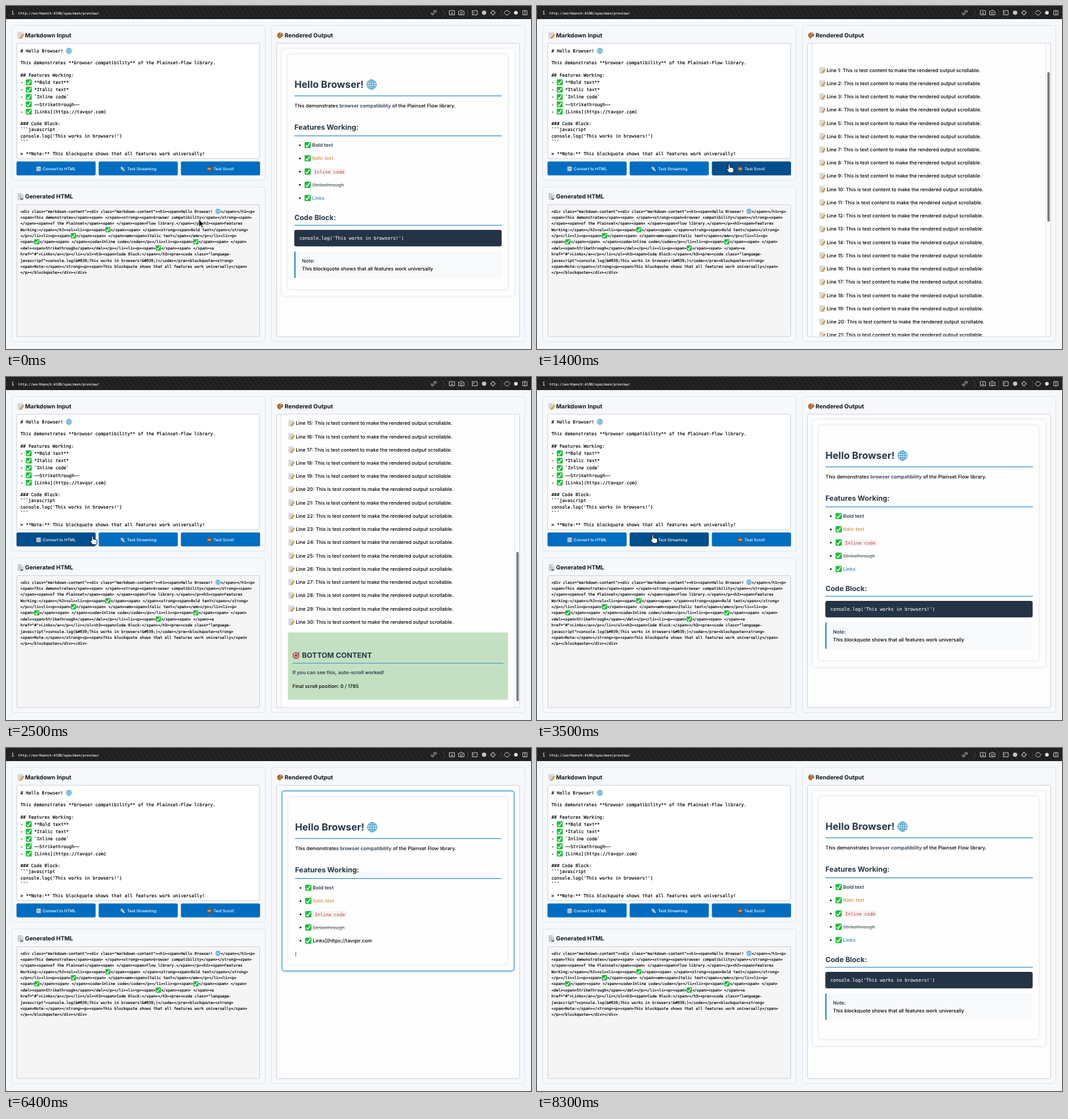
These frames come from a looping animation (800 px wide and 524 px high, 8.4 s). An HTML page:

```html
<!DOCTYPE html>
<html lang="en">
<head>
<meta charset="utf-8">
<title>Text renderer demo</title>
<style>
  html, body { margin: 0; width: 100%; height: 100%; overflow: hidden; background: #f5f8fb; }
  svg.stage { display: block; width: 100vw; height: 100vh; }
  text { font-family: Inter, "Open Sans", sans-serif; font-weight: 450; white-space: pre; text-rendering: geometricPrecision; fill: #000; }
  .mono { font-family: "DejaVu Sans Mono", monospace; font-weight: 400; stroke: #000; stroke-width: .16; }
  .head { font-weight: 680; fill: #263747; }
  .title { font-weight: 650; fill: #14171a; }
  .label { font-weight: 550; fill: #fff; }
  .light { fill: #f0f0f0; stroke: #f0f0f0; stroke-width: .1; }
  .b { font-weight: 640; fill: #2c3e50; }
  .i { font-style: italic; fill: #d07a1c; }
  .s { text-decoration: line-through; fill: #74807f; }
  .a { fill: #2b83cc; }
  .c { font-family: "DejaVu Sans Mono", monospace; font-weight: 400; font-size: 6.97px; fill: #d63a2e; }
  .panel { fill: #f6f8fb; stroke: #dbe1e9; stroke-width: .8; }
  .field { fill: #fff; stroke: #c5cad0; stroke-width: .8; }
  .button { fill: #006dc0; }
  .button.hover { fill: #004e8c; }
  .card { fill: #fefefe; stroke: #e7eaee; stroke-width: .6; filter: drop-shadow(0 .8px 2px rgba(0,0,0,.09)); }
  .card.live { stroke: #3f97d5; stroke-width: 1.15; filter: drop-shadow(0 0 2px rgba(52,152,219,.4)); }
</style>
</head>
<body>
<svg class="stage" viewBox="0 0 800 524" preserveAspectRatio="none">
  <defs>
    <pattern id="stripes" width="6" height="6" patternUnits="userSpaceOnUse" patternTransform="rotate(-35)">
      <rect width="6" height="6" fill="#1e1e1e"/><rect width="3" height="6" fill="#252525"/>
    </pattern>
    <clipPath id="view"><rect x="412.5" y="57.5" width="370" height="447"/></clipPath>
    <symbol id="check" viewBox="0 0 20 20">
      <rect x=".5" y=".5" width="19" height="19" rx="3.5" fill="#1fbd3a"/>
      <path d="M4 11l4 4.5L16 4" fill="none" stroke="#fff" stroke-width="2.8"/>
    </symbol>
    <symbol id="globe" viewBox="0 0 20 20">
      <circle cx="10" cy="10" r="9" fill="#d4eefa"/>
      <g fill="none" stroke="#2f90bf" stroke-width="1.15">
        <circle cx="10" cy="10" r="9"/><ellipse cx="10" cy="10" rx="4.3" ry="9"/>
        <path d="M10 1v18M1 10h18M2.5 5.5h15M2.5 14.5h15"/>
      </g>
    </symbol>
    <symbol id="memo" viewBox="0 0 20 20">
      <path d="M2 1h14v18H2z" fill="#eceeed" stroke="#a9adb0"/>
      <path d="M4 5h9M4 8h9M4 11h6M4 14h5" stroke="#9aa0a5"/>
      <path d="M9 16l8-10 3 2.5L12 18l-4 1z" fill="#eda52a" stroke="#7d5220" stroke-width=".8"/>
    </symbol>
    <symbol id="page" viewBox="0 0 20 20">
      <path d="M3 1h9l5 5v13H3z" fill="#e9ebec" stroke="#85898d"/>
      <path d="M5 5h5M5 8h9M5 11h9M5 14h6" stroke="#777"/><path d="M10 14l8 1-3 5-6-1z" fill="#6f7479"/>
    </symbol>
    <symbol id="palette" viewBox="0 0 20 20">
      <path d="M10 2c6 0 10 4 9 9-1 4-5 2-6 4s0 4-4 4C4 19 1 14 1 10s4-8 9-8z" fill="#b5733c"/>
      <circle cx="6" cy="7" r="2" fill="#e23e35"/><circle cx="12" cy="5.5" r="2" fill="#f3c72e"/>
      <circle cx="5" cy="12" r="2" fill="#3aa64f"/><circle cx="15.5" cy="9" r="2" fill="#3b7bd6"/>
    </symbol>
    <symbol id="cycle" viewBox="0 0 20 20">
      <rect x="1" y="1" width="18" height="18" rx="3" fill="#8fa9bb"/>
      <path d="M5 9a5 5 0 0 1 9-2V4M15 11a5 5 0 0 1-9 2v3" fill="none" stroke="#fff" stroke-width="2"/>
    </symbol>
    <symbol id="feed" viewBox="0 0 20 20">
      <path d="M3 2l5 1 9 11-2 4-5-3L3 6z" fill="#c9d3da"/><path d="M2 9l5 5M11 3l5 5" stroke="#78909c" stroke-width="2.4"/>
      <circle cx="16" cy="17" r="2" fill="#e2a13a"/>
    </symbol>
    <symbol id="scroll" viewBox="0 0 20 20">
      <path d="M3 2h14v16H3z" fill="#b97c43"/><path d="M2 2h16v4H2zM2 14h16v4H2z" fill="#76451f"/><path d="M6 8.5h8M6 11.5h8" stroke="#f0d2a0"/>
    </symbol>
    <symbol id="target" viewBox="0 0 20 20">
      <circle cx="9" cy="11" r="8.5" fill="#b83a36"/><circle cx="9" cy="11" r="5.8" fill="#e9dcd8"/><circle cx="9" cy="11" r="3.8" fill="#b83a36"/>
      <path d="M9 11l8-8" stroke="#39566b" stroke-width="1.6"/><path d="M14 5l2-4 1 2 2 1-3 2z" fill="#4a9ac4"/>
    </symbol>
  </defs>
  <g id="page-frame"></g>
  <g id="buttons"></g>
  <g id="output" clip-path="url(#view)"></g>
  <g id="pointer" stroke-linejoin="round">
    <path id="arrow" d="M0 0V11.2L2.7 8.7L4.6 12.8L6.4 12L4.6 8H8Z" fill="#000" stroke="#fff" stroke-width=".8"/>
    <path id="hand" d="M-1.2 .8Q0-.8 1.2 .8V5Q4.8 4.4 7 6.6V10L6 13H0L-3 8.8Q-4 6.4-2.5 6.4L-1.2 7.6Z" fill="#fff" stroke="#000" stroke-width=".9"/>
  </g>
</svg>
<script>
const LOOP = 8400;
const MONO = 0.602;   // advance of the monospaced face, in em
const BODY = 7.47;
const $ = id => document.getElementById(id);

const esc = s => s.replace(/&/g, '&amp;').replace(/</g, '&lt;').replace(/>/g, '&gt;');
const rect = (x, y, w, h, rx, attrs) => `<rect x="${x}" y="${y}" width="${w}" height="${h}" rx="${rx}" ${attrs}/>`;
const icon = (name, x, cy, size) => `<use href="#${name}" x="${x}" y="${cy - size / 2}" width="${size}" height="${size}"/>`;
// Text is placed by the middle of its capital letters.
const markup = (x, cy, size, cls, html) => `<text x="${x}" y="${cy + size * .364}" font-size="${size}" class="${cls}">${html}</text>`;
const text = (x, cy, size, cls, s) => markup(x, cy, size, cls, esc(s));
const rule = (x, y, w, color = '#3d93cf') => rect(x, y - .6, w, 1.2, 0, `fill="${color}"`);

const EMOJI = { '✅': 'check', '🌐': 'globe' };
function monoLine(x, cy, size, s, gap, art) {
  return s.split(/(✅|🌐)/u).map(part => {
    const name = EMOJI[part];
    const out = name ? icon(name, x - .2, cy, art) : text(x, cy, size, 'mono', part);
    x += name ? gap : part.length * size * MONO;
    return out;
  }).join('');
}

const input = `# Hello Browser! 🌐

This demonstrates **browser compatibility** of the Plainset-Flow library.

## Features Working:
- ✅ **Bold text**
- ✅ *Italic text*
- ✅ \`Inline code\`
- ✅ ~~Strikethrough~~
- ✅ [Links](https://tavqor.com)

### Code Block:
\`\`\`javascript
console.log('This works in browsers!')
\`\`\`

> **Note:** This blockquote shows that all features work universally!`.split('\n');

const generated = `<div class="markdown-content"><div class="markdown-content"><h1><span>Hello Browser! 🌐</span></h1><p>
<span>This demonstrates</span><span> </span><strong><span>browser compatibility</span></strong><span>
</span><span>of the Plainset</span><span> </span><span>Flow library.</span></p><h2><span>Features
Working:</span></h2><ul><li><p><span>✅</span><span> </span><strong><span>Bold text</span></strong>
</p></li><li><p><span>✅</span><span> </span><em><span>Italic text</span></em></p></li><li><p>
<span>✅</span><span> </span><code>Inline code</code></p></li><li><p><span>✅</span><span> </span>
<del><span>Strikethrough</span></del></p></li><li><p><span>✅</span><span> </span><a
href="#">Links</a></p></li></ul><h3><span>Code Block:</span></h3><pre><code class="language-
javascript">console.log(&#039;This works in browsers!&#039;)</code></pre><blockquote><strong>
<span>Note:</span></strong><p><span>This blockquote shows that all features work universally</span>
</p></blockquote></div></div>`.split('\n');

function toolbar() {
  const shapes = [
    'M649.5 12l5-4M651 8.5l2-1.6q2-1 2.7.6t-.8 2.6M653 11.5l-2 1.6q-2 1-2.7-.6t.8-2.6',
    'M675.5 7h8v6.5h-8zM677.5 11.5h4M679.5 8.5v2',
    'M689.5 8h2l1-1.5h2.5l1 1.5h2v5.5h-8.5zM693.7 9.2a1.6 1.6 0 1 0 .1 0',
    'M710.5 7h7.5v6.5h-7.5zM712 9l1.5 1.2-1.5 1.2',
    'M742 7.3a3 3 0 1 0 .1 0M742 6v2.5M742 12v2.5M738 10.3h2.5M743.7 10.3h2.5',
    'M762 7l-3 3.3 3 3.3M765 7l3 3.3-3 3.3M762 7h3M762 13.6h3',
    'M787.5 7h6.5v6.5h-6.5zM790.8 7v6.5'
  ];
  return rect(0, 0, 800, 20, 0, 'fill="url(#stripes)"')
    + text(8, 10.4, 8, 'mono light', 'i')
    + text(19, 10.6, 5.24, 'mono light', 'http://workbench:4100/specimen/preview/')
    + `<path d="${shapes.join('')}" fill="none" stroke="#cfcfcf" stroke-width=".9"/>`
    + '<path d="M667 5v11M703.5 5v11M755 5v11" stroke="#484848" stroke-width=".7"/>'
    + '<circle cx="728.5" cy="10.3" r="3.3" fill="#c4c4c4"/><circle cx="777" cy="10.3" r="2.8" fill="#e2e2e2"/>';
}

function pageFrame() {
  const panel = (x, y, h, name, title) => rect(x, y, 386, h, 4, 'class="panel"')
    + icon(name, x + 8, y + 15, 10.5) + text(x + 20, y + 14.8, 8.9, 'title', title);
  let out = toolbar()
    + panel(9, 29.7, 236.3, 'memo', 'Markdown Input')
    + panel(9, 276.2, 236.6, 'page', 'Generated HTML')
    + panel(404.5, 29.7, 483, 'palette', 'Rendered Output')
    + rect(16.5, 57, 370, 176, 1.5, 'class="field"')
    + rect(16.5, 303.5, 370, 201.5, 1.5, 'class="field" style="fill:#f5f5f5"')
    + rect(412.3, 57, 370.4, 448, 1.5, 'class="field" style="fill:#fdfdfd"');
  let y = 59.25;
  for (const line of input) {
    y += line.includes('✅') ? 11.15 : 9.25;
    out += monoLine(22, y, 6.77, line, 8.7, 9.6);
  }
  generated.forEach((line, i) => out += monoLine(22, 313.6 + i * 9.35, 5.805, line, 8.2, 8.4));
  return out;
}

const BUTTON_WIDTH = 120.6;
const buttons = [
  [16, 'cycle', 45.5, 56, 'Convert to HTML'],
  [141.2, 'feed', 173.5, 184.5, 'Test Streaming'],
  [266.5, 'scroll', 305.5, 316, 'Test Scroll']
];
const drawButtons = hot => buttons.map(([x, name, ix, tx, label], i) =>
  rect(x, 237.6, BUTTON_WIDTH, 21.2, 2, `class="button${i === hot ? ' hover' : ''}"`)
  + icon(name, ix, 248.8, 8.4) + text(tx, 248.8, 6.2, 'label', label)).join('');

// Each block: kind, middle y, text, hidden characters before and after, y of the caret that follows.
const blocks = [
  ['h1', 120, 'Hello Browser! 🌐', 2, 2, 152],
  ['p', 152, 'This demonstrates **browser compatibility** of the Plainset Flow library.', 0, 2, 172],
  ['h2', 185, 'Features Working:', 3, 1, 212],
  ...['**Bold text**', '*Italic text*', '`Inline code`', '~~Strikethrough~~', '[Links](https://tavqor.com)']
    .map((s, i) => ['li', 212.5 + i * 20.2, s, 4, i === 4 ? 2 : 1, 233.2 + i * 20.2]),
  ['h3', 323, 'Code Block:', 4, 1, 350],
  ['pre', 354.3, "console.log('This works in browsers!')", 14, 6, 382],
  ['quote', 389, '**Note:** This blockquote shows that all features work universally', 2, 0, 430]
];

const span = cls => `<tspan class="${cls}">$1</tspan>`;
const inline = s => esc(s)
  .replace(/\*\*(.+?)\*\*/g, span('b'))
  .replace(/\*([^*]+)\*/g, span('i'))
  .replace(/~~(.+?)~~/g, span('s'))
  .replace(/`(.+?)`/g, '<tspan class="c" dx="3">$1</tspan>')
  .replace(/\[(.+?)\]\(.+?\)/g, span('a'))
  .replace('[', '');

const draw = {
  h1: (y, s, w) => text(439.5, y, 14.8, 'head', s.slice(0, 14)) + (s.length > 15 ? icon('globe', 549, y, 16) : '') + rule(439.5, 137.3, w),
  p: (y, s) => markup(439.5, y, BODY, '', inline(s)),
  h2: (y, s, w) => text(439.5, y, 10.9, 'head', s) + rule(439.5, 198.4, w),
  h3: (y, s, w) => text(439.5, y, 10.8, 'head', s) + rule(439.5, 335, w),
  li: (y, s) => `<circle cx="447.7" cy="${y + .2}" r="1.3" fill="#111"/>` + icon('check', 454.6, y, 10.2)
    + (/^`.+`$/.test(s) ? rect(466.5, y - 5, 52, 10.2, 1.5, 'fill="#f2f3f4"') : '')
    + markup(466.5, y, BODY, '', inline(s)),
  pre: (y, s, w) => rect(439.3, 342, w, 25.3, 3, 'fill="#243446"') + text(447, y, 6.97, 'mono light', s),
  quote: (y, s, w) => {
    const [note, rest = ''] = s.split(/(?<=:\*\*) /);
    return rect(439.3, 375, w, 40.6, 2, 'fill="#f7f9fb"') + rect(439.3, 375, 2, 40.6, .8, 'fill="#2b86c2"')
      + markup(451, y, BODY, '', inline(note)) + text(451, 401.7, BODY, '', rest);
  }
};

function drawDocument(typed, live, bottom) {
  const width = live ? 314 : 316;
  let body = '', caret = 99, start = 0;
  for (const [kind, y, s, before, after, next] of blocks) {
    const shown = typed - start - before;
    if (shown > 0) {
      body += draw[kind](y, [...s].slice(0, shown).join(''), width);
      caret = next;
    }
    start += before + [...s].length + after;
  }
  if (live) bottom = caret + 26.6;
  const inset = live ? .6 : 0;
  return rect(420 + inset, 65.3 + inset / 2, 354.8 - inset * 2, bottom - 65.3 - inset / 2, 4, `class="card${live ? ' live' : ''}"`)
    + rect(429.3 + inset, 73.6 + inset * 2, 335.5 - inset * 2, bottom - 83.5 - inset * 2, 4, 'class="card"')
    + `<g transform="translate(${live ? '1 1' : '0 0'})">${body}`
    + (live ? rect(440, caret - 3.6, 1.1, 7.2, 0, 'fill="#3490d2"') : '') + '</g>';
}

const SCROLL = 389;
function drawScrollTest(pos) {
  let body = rect(419.7, -324, 355, 860, 4, 'class="card"');
  for (let n = 1; n <= 30; n++) {
    const y = 70.6 + (n - 15) * 20.23;
    body += icon('memo', 429.8, y, 10) + text(441.5, y, BODY, '', `Line ${n}: This is test content to make the rendered output scrollable.`);
  }
  body += rect(429.5, 390.3, 335.5, 103, 2, 'fill="#c3e1c2"')
    + icon('target', 436.5, 425, 12) + text(451, 424.8, 11.1, 'head', 'BOTTOM CONTENT') + rule(436.5, 437.3, 321.5, '#5f9fcb')
    + text(436.5, 451.6, BODY, 'b', 'If you can see this, auto-scroll worked!')
    + text(436.5, 472.2, BODY, '', 'Final scroll position: 0 / 1785');
  return `<g transform="translate(0 ${(SCROLL - pos).toFixed(2)})">${body}</g>`
    + rect(777.7, 59 + 208 * pos / SCROLL, 3.6, 228.5, 1.8, 'fill="#7c7c7c"');
}

const smooth = k => k * k * (3 - 2 * k);
const linear = k => k;
function track(steps, t, ease) {
  const i = steps.findIndex(s => s[0] > t);
  if (i === 0) return steps[0].slice(1);
  if (i < 0) return steps[steps.length - 1].slice(1);
  const [a, b] = [steps[i - 1], steps[i]];
  const k = ease((t - a[0]) / (b[0] - a[0]));
  return a.slice(1).map((v, j) => v + (b[j + 1] - v) * k);
}

const pointerPath = [
  [100, 294, 326], [900, 294, 241.5], [1300, 294, 241.5], [1700, 286, 243], [2150, 286, 243],
  [2650, 90, 243], [3100, 90, 243], [3500, 176.5, 241], [3900, 176.5, 241], [4100, 200, 285]
];
const typing = [[3900, 0], [5000, 58], [6400, 222], [7650, 367]];
const scrolling = [[1300, 0], [1650, SCROLL]];

function drawOutput(t) {
  if (t >= 1300 && t < 2650) return drawScrollTest(track(scrolling, t, smooth)[0]);
  if (t < 3850) return drawDocument(999, false, 443);
  if (t < 7700) return drawDocument(Math.floor(track(typing, t, linear)[0] + .01), true);
  return drawDocument(999, false, 455);
}

const last = {};
function show(id, html) {
  if (last[id] !== html) $(id).innerHTML = last[id] = html;
}

function render(t) {
  const [x, y] = track(pointerPath, t, smooth);
  const visible = t < 4100;
  const hot = visible && y > 238 && y < 258.6 ? buttons.findIndex(b => x >= b[0] && x <= b[0] + BUTTON_WIDTH) : -1;
  show('buttons', drawButtons(hot));
  show('output', drawOutput(t));
  $('pointer').setAttribute('transform', `translate(${x} ${y})`);
  $('pointer').style.display = visible ? '' : 'none';
  $('hand').style.display = hot < 0 ? 'none' : '';
  $('arrow').style.display = hot < 0 ? '' : 'none';
}

show('page-frame', pageFrame());
const begin = performance.now();
function tick() {
  render((performance.now() - begin) % LOOP);
  requestAnimationFrame(tick);
}
tick();
</script>
</body>
</html>
```
